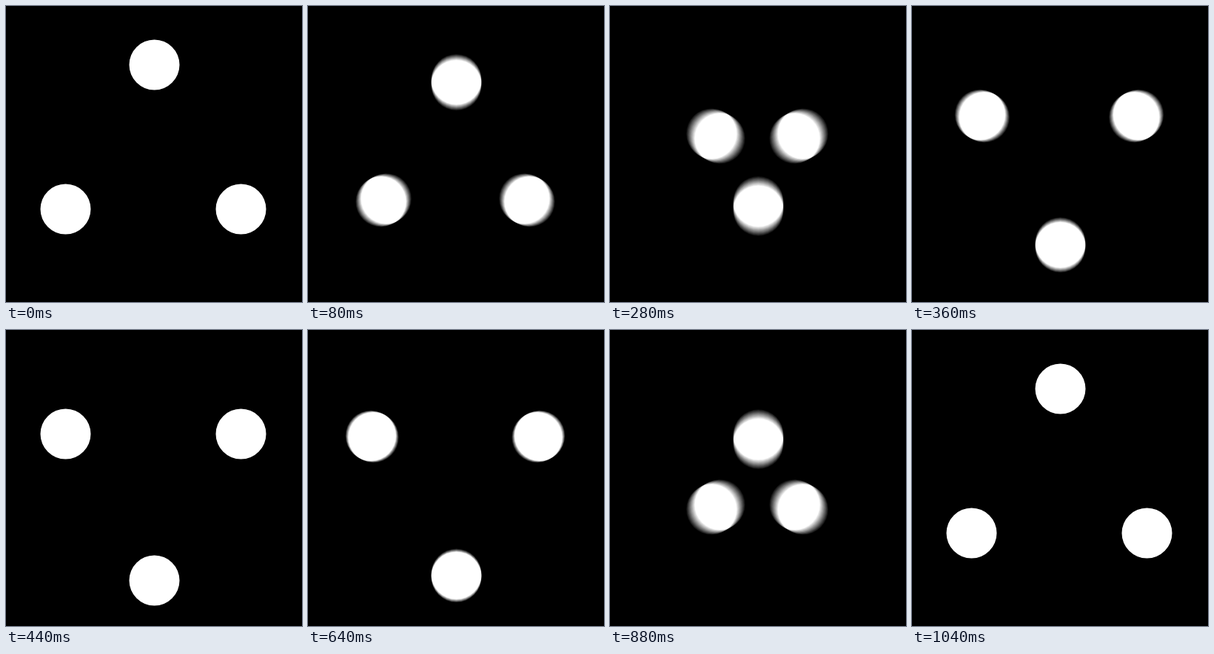
An HTML page with a canvas for the animation above (1.2 s loop, 400 by 400 pixels).

```html
<!DOCTYPE html>
<html lang="en">
<head>
<meta charset="utf-8">
<title>Three dots</title>
<style>
html, body { margin: 0; width: 100%; height: 100%; overflow: hidden; background: #000; }
canvas { display: block; width: 400px; height: 400px; }
</style>
</head>
<body>
<canvas id="stage" width="400" height="400"></canvas>
<script>
const ctx = document.getElementById('stage').getContext('2d');
const STEP = 40;            // ms per drawn step
const HALF = 15;            // steps per crossing, rest included
const MOVE = 10.8;          // steps spent moving
const OPEN = -0.09;         // shutter start, in steps
const SHUTTER = 0.38;       // shutter length, in steps
const SAMPLES = 17;         // 17 * 15 = 255
const RADIUS = 34;

// Each dot swaps between two opposite ends: [x0, y0, x1, y1]
const paths = [
  [200.5, 79.5, 200.5, 338.5],
  [80.5, 274.5, 317.5, 140.5],
  [317.5, 274.5, 80.5, 140.5]
];

const clamp = v => Math.min(1, Math.max(0, v));
const ease = v => 0.5 - 0.5 * Math.cos(Math.PI * clamp(v));
const mix = (a, b, k) => a + (b - a) * k;

function dots(k) {
  ctx.beginPath();
  for (const [x0, y0, x1, y1] of paths) {
    const x = mix(x0, x1, k), y = mix(y0, y1, k);
    ctx.moveTo(x + RADIUS, y);
    ctx.arc(x, y, RADIUS, 0, Math.PI * 2);
  }
  ctx.fill();
}

function draw(ms) {
  const step = Math.floor(ms / STEP) % (2 * HALF);
  const back = step >= HALF;
  const local = step % HALF;

  ctx.globalCompositeOperation = 'source-over';
  ctx.fillStyle = '#000';
  ctx.fillRect(0, 0, 400, 400);

  if (local === 0 || local > MOVE) {
    ctx.fillStyle = '#fff';
    dots((local > 0) !== back ? 1 : 0);
    return;
  }

  // Motion blur: add up evenly spaced moments of the open shutter
  ctx.globalCompositeOperation = 'lighter';
  ctx.fillStyle = 'rgb(15,15,15)';
  for (let i = 0; i < SAMPLES; i++) {
    const t = local + OPEN + SHUTTER * i / (SAMPLES - 1);
    const k = ease(t / MOVE);
    dots(back ? 1 - k : k);
  }
}

const start = performance.now();
function loop() {
  draw(performance.now() - start);
  requestAnimationFrame(loop);
}
loop();
</script>
</body>
</html>
```
